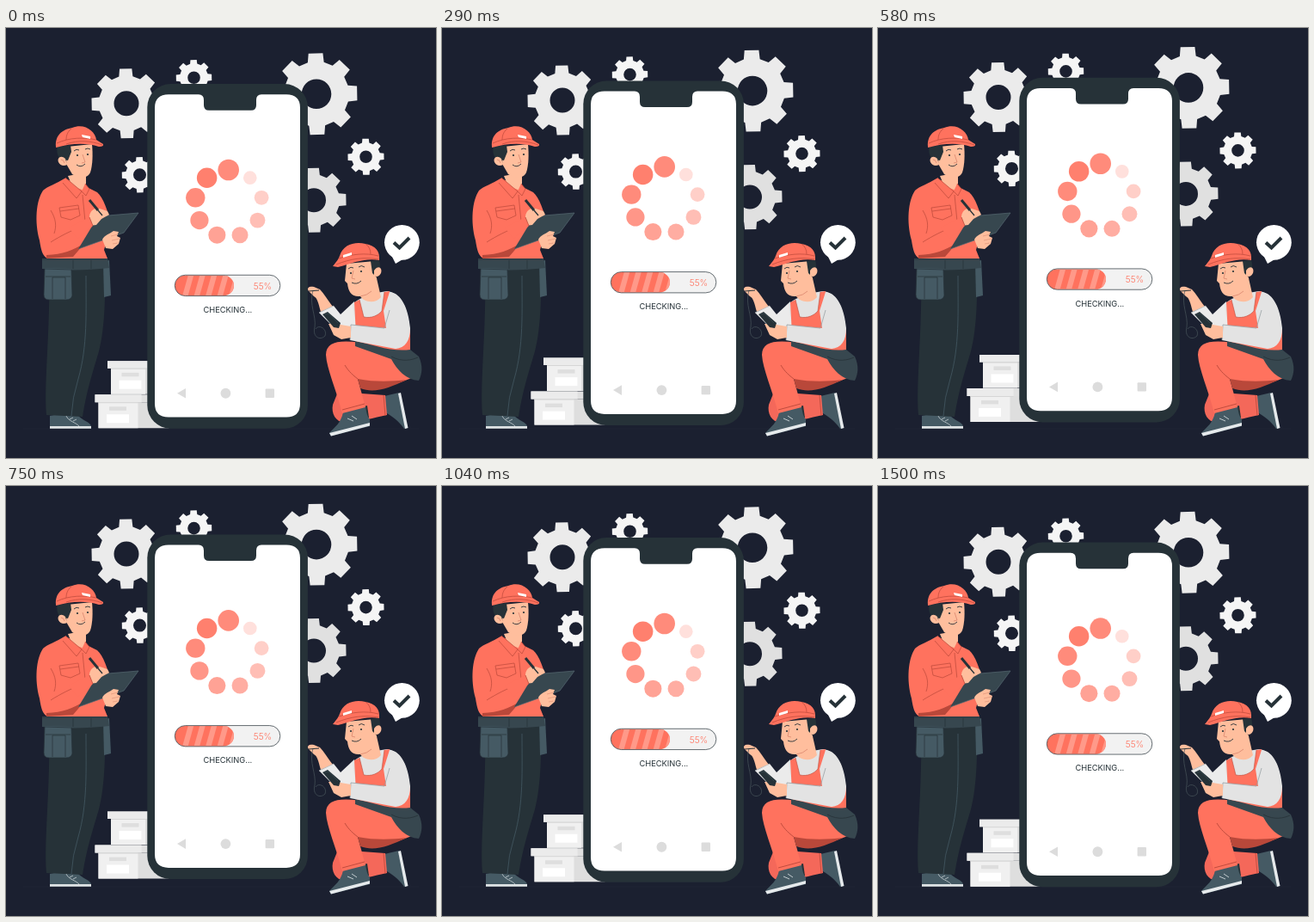
Write an HTML page with a canvas that moves like this. It is 500 px wide and 500 px high and loops after 1.54 s.

```html
<!DOCTYPE html>
<html lang="en">
<head>
<meta charset="utf-8">
<title>Checking</title>
<style>
html, body { margin: 0; width: 100%; height: 100%; overflow: hidden; background: #1b2030; }
canvas { display: block; width: 500px; height: 500px; }
</style>
</head>
<body>
<canvas id="stage" width="500" height="500"></canvas>
<script>
const ctx = document.getElementById('stage').getContext('2d');
const LOOP = 1540, FPS = 24, FRAMES = 37;
const BG = '#1b2030', CORAL = '#ff725e', SHADE = '#b9483a', SKIN = '#ffbe9d',
      INK = '#263238', SLATE = '#37474f', STEEL = '#455a64', CLOTH = '#e3e3e3';

function fill(d, color) {
  ctx.fillStyle = color;
  ctx.fill(new Path2D(d));
}

function line(d, color = INK, width = 0.8) {
  ctx.strokeStyle = color;
  ctx.lineWidth = width;
  ctx.stroke(new Path2D(d));
}

function disc(x, y, r, color) {
  ctx.fillStyle = color;
  ctx.beginPath();
  ctx.arc(x, y, r, 0, Math.PI * 2);
  ctx.fill();
}

function box(x, y, w, h, color, r = 0) {
  ctx.fillStyle = color;
  ctx.beginPath();
  ctx.roundRect(x, y, w, h, r);
  ctx.fill();
}

function text(str, x, y, size, weight, color) {
  ctx.font = `${weight} ${size}px Inter, sans-serif`;
  ctx.fillStyle = color;
  ctx.fillText(str, x, y);
}

function gear(x, y, radius, hole, color) {
  const teeth = 8, root = radius * 0.79;
  ctx.fillStyle = color;
  ctx.beginPath();
  for (let i = 0; i < teeth; i++) {
    const mid = i * Math.PI * 2 / teeth - Math.PI / 2 - 0.02;
    for (const [a, r] of [[-0.25, root], [-0.175, radius], [0.175, radius], [0.25, root]]) {
      ctx.lineTo(x + Math.cos(mid + a) * r, y + Math.sin(mid + a) * r);
    }
  }
  ctx.closePath();
  ctx.moveTo(x + hole, y);
  ctx.arc(x, y, hole, 0, Math.PI * 2, true);
  ctx.fill();
}

function gears() {
  gear(140, 88, 41, 14.5, '#ebebeb');
  gear(218.5, 58, 21, 7.3, '#f5f5f5');
  gear(361, 77, 48, 17.3, '#ebebeb');
  gear(418.5, 150, 21.3, 7.3, '#f5f5f5');
  gear(358, 200.5, 38, 14, '#e0e0e0');
  gear(155.5, 171, 21, 7.5, '#f5f5f5');
}

function carton(x, y, bodyWidth, bodyHeight, lidHeight) {
  box(x + 4, y + lidHeight, bodyWidth + 36, bodyHeight, '#dedede');
  box(x + 4, y + lidHeight, bodyWidth, bodyHeight, '#f0f0f0');
  box(x, y, bodyWidth + 36, lidHeight, '#e0e0e0');
  box(x, y, bodyWidth + 8, lidHeight, '#ebebeb');
  box(x + 4, y + lidHeight, bodyWidth + 4, 1, '#d6d6d6');
  box(x + 16.5, y + lidHeight + 5, 20, 4.5, '#dedede');
  box(x + 13.5, y + lidHeight + 14, 26, 10, '#fff');
}

function spinner() {
  const alphas = [0.82, 0.9, 0.82, 0.74, 0.66, 0.58, 0.46, 0.34, 0.22];
  alphas.forEach((alpha, i) => {
    const a = -Math.PI / 2 - i * Math.PI * 2 / alphas.length;
    ctx.globalAlpha = alpha;
    disc(258.7 + 39 * Math.cos(a), 204.3 + 39 * Math.sin(a), 12.3 - i * 0.56, CORAL);
  });
  ctx.globalAlpha = 1;
}

function progressBar() {
  box(196.3, 287.5, 122.5, 24.3, '#f2f2f2', 12.1);
  ctx.save();
  ctx.beginPath();
  ctx.roundRect(196.5, 288, 68.5, 23.4, 11.7);
  ctx.clip();
  box(196, 287, 70, 26, CORAL);
  for (let x = 205; x < 265; x += 13.5) {
    fill(`M${x} 312h6.5l7-25h-6.5Z`, '#ff9989');
  }
  ctx.restore();
  ctx.strokeStyle = INK;
  ctx.lineWidth = 0.7;
  ctx.beginPath();
  ctx.roundRect(196.3, 287.5, 122.5, 24.3, 12.1);
  ctx.stroke();
  text('55%', 287.8, 304, 10.2, 300, CORAL);
  text('CHECKING...', 229.5, 331.2, 9.3, 400, INK);
}

function phone() {
  box(164.3, 65.3, 186.6, 400.7, INK, 27);
  fill('M189 77.5H224Q230 77.5 230 84V90Q230 96 236 96H285Q291 96 291 90V84Q291 77.5 297 77.5H326' +
       'Q342 77.5 342 93V437Q342 452.8 326 452.8H189Q173 452.8 173 437V93Q173 77.5 189 77.5Z', '#fff');
  spinner();
  progressBar();
  fill('M199 425L209 419.2V430.8Z', '#dcdcdc');
  disc(255.4, 425, 5.9, '#dcdcdc');
  box(301.6, 419.8, 10.4, 10.4, '#dcdcdc', 1);
}

function standingWorker() {
  // shoes and trousers
  fill('M51 451L61 449L83 450C88 456 98 458 99 463V465.5H51Z', STEEL);
  fill('M51 463H99V465.7H51Z', '#dfe3e5');
  line('M70 451C72 457 82 459 85 463M74 455l4 -2M78 457l4 -2', '#c7d0d4', 0.8);
  fill('M50 278H115C116 318 114 354 108 376C101 400 94 420 89 452L47 450C44 410 52 350 50 278Z', INK);
  line('M93 288C93 330 95 370 84 408Q77 430 76 451', STEEL, 0.8);

  // shirt
  fill('M68 175C59 181 48 184 43 189C35 201 33 225 39 247C41 259 42 264 48 268H118L114 258L122 230' +
       'C119 213 113 197 106 191L92 184Z', CORAL);
  fill('M72 172L93 168V181L91 189L77 184Z', SKIN);
  fill('M69 174L88 190L82 198L66 180Z', CORAL);
  fill('M92 181L97 187L93 195L88 190Z', CORAL);
  line('M69 174L88 190L82 198L66 180M92 181L97 187L93 195L88 190M89 194L92 225M62 209L84 206L86 218L75 223L64 220Z' +
       'M63 213L85 210M52 212C58 222 59 230 56 239M52 249C63 242 75 236 92 229', SHADE, 0.7);
  fill('M47 264C66 263 78 259 91 250L84 259L78 266L47 268Z', SHADE);

  // belt and pouches
  fill('M113 272L120 270L122 311L114 313Z', STEEL);
  fill('M42 268H118L120 279C96 282 68 282 42 280Z', SLATE);
  line('M42 269H117M78 270V280M99 270V280', INK, 0.7);
  fill('M45 279L76 280L77 311Q76 316 70 316H50Q44 316 44 310Z', STEEL);
  line('M45 280L76 281L77 311Q76 316 70 316H50Q44 316 44 310ZM54 290H69V315M54 290V315M46 289H75', INK, 0.7);

  // clipboard and hands
  fill('M107 219L154 215L137 238L84 257Z', SLATE);
  line('M107 219L154 215L137 238L84 257', '#566971', 0.7);
  fill('M112 246C114 241 121 239 125 236L131 237L129 242L133 244L131 251L124 257L116 256Z', SKIN);
  line('M122 242L130 240M123 247L132 245M124 251L130 250', '#d98d75', 0.6);
  fill('M97 219C98 212 103 209 109 210L118 213L120 217L111 222L105 229L97 230Z', SKIN);
  fill('M73 232L97 220L101 230L83 245Z', CORAL);
  line('M97 220L101 230', SHADE, 0.8);
  line('M97 200L107 212', INK, 3);
  line('M107 212L112 218', INK, 1.3);

  // head
  fill('M60 139C58 145 61 151 65 155L75 155V137Z', INK);
  fill('M71 138L100 135C101 146 101 159 98 168C94 176 84 175 77 170L70 158Z', SKIN);
  fill('M59 138L75 136L76 144L72 154L67 153L61 148Z', INK);
  fill('M69 152C64 147 59 151 61 156C63 160 67 161 71 159Z', SKIN);
  line('M64 153Q67 153 68 157M89 147L92 156L88 157', '#d47f68', 0.7);
  line('M79 143Q82 140 85 142M92 141Q95 139 98 141M82 159Q87 163 92 158', INK, 0.9);
  disc(83, 148, 1.1, INK);
  disc(95, 147, 1.1, INK);

  // cap
  fill('M58 138C57 124 66 118 77 116C91 110 104 120 105 130L113 135Q114 138 108 138C93 133 76 134 58 139Z', CORAL);
  line('M59 134C74 127 91 127 105 130M70 135C84 130 98 131 112 136M76 117C71 121 70 126 70 130', SHADE, 0.7);
  fill('M88 124L98 126V129L89 127Z', '#fff');
}

function kneelingWorker() {
  // rear leg
  fill('M440 428L457 424C460 439 465 455 467 465L463 466C457 457 447 450 441 447Z', STEEL);
  fill('M456 425L459 424L467.5 465L464 466Z', '#e6eaec');
  fill('M386 423L441 427L443 450C428 453 412 458 394 459C383 458 378 448 380 438Z', '#f4685a');
  line('M439 427L441 451', SHADE, 0.8);

  // rear arm and torso
  fill('M352 306C349 302 353 300 358 301L365 304C370 309 373 315 380 324L366 330C363 319 362 314 358 312Z', SKIN);
  fill('M364 331L381 323L389 333L405 318L409 348L381 348Z', '#ebebeb');
  line('M364 331L381 323', '#b8bec1', 0.7);
  fill('M403 321C410 314 429 307 444 306C460 309 467 327 469 347L470 377L410 370Z', CLOTH);
  fill('M405 319L411 316L416 336C425 338 433 334 437 329L440 307L446 306L445 332L470 350V382L408 374Z', CORAL);
  line('M411 316L416 336C425 338 433 334 437 329L440 307', SHADE, 0.6);

  // front leg
  fill('M401 444L420 439L422 453L400 456Z', INK);
  fill('M392 447L418 440C419 446 420 452 423 455V463L378 474.5L376 471C383 463 389 460 392 447Z', STEEL);
  fill('M376 471L423 459V462.5L378 474.5Z', '#e6eaec');
  line('M397 454l7 3M402 451l6 4', '#d1d9dc', 0.9);
  fill('M378 368C391 360 425 367 468 377C484 386 483 403 469 408C448 416 428 424 409 408L418 441L391 448' +
       'C384 420 373 397 372 380Q372 372 378 368Z', CORAL);
  line('M409 408C401 402 397 397 394 392M391 444L417 437', SHADE, 0.9);
  fill('M409 408C430 412 449 411 466 409C445 419 428 425 412 419Z', SHADE);
  fill('M406 364C426 368 448 377 470 374L480 382C485 393 484 402 480 410C465 409 455 398 448 385L406 370Z', SLATE);
  line('M448 382C461 389 472 386 479 383', INK, 0.8);

  // front arm, tester and cable
  fill('M446 307C460 308 468 327 470 349C470 364 464 372 453 373L400 363L401 345L442 349L439 329Z', CLOTH);
  line('M401 345L400 363M401 345L440 349L446 328', '#8f989c', 0.7);
  fill('M375 344C380 344 385 341 389 345L401 347V360L390 362L381 357Z', SKIN);
  fill('M368 333L374 330L389 343L387 349L381 348Z', INK);
  line('M370 333L375 332L386 343', SLATE, 0.8);
  line('M357 305C352 322 361 334 359 348C356 359 365 364 371 358C374 350 364 344 360 350', '#4a565c', 0.7);
  line('M352 306L364 305', INK, 1);

  // head
  fill('M396 274L429 271L431 291L436 313C430 321 416 319 412 312C402 313 398 307 397 297L394 294Z', SKIN);
  fill('M424 271L434 270C436 277 435 283 431 290L426 285Z', INK);
  fill('M428 282C433 275 438 279 436 285C434 289 431 290 428 288Z', SKIN);
  line('M404 282L402 291L406 292M412 312Q420 311 425 306', '#d47f68', 0.7);
  line('M398 280Q401 277 404 279M410 278Q413 275 417 278M402 296Q408 299 413 294', INK, 0.9);
  disc(401, 285, 1.1, INK);
  disc(413, 283, 1.1, INK);

  // cap
  fill('M380 277C384 272 386 270 388 265C392 252 405 248 418 251C430 253 435 260 434 270C416 267 402 274 386 278Z', CORAL);
  line('M387 268C402 263 418 261 433 265M384 275C401 268 417 266 433 269M418 251Q424 255 424 263', SHADE, 0.7);
  fill('M392 264L402 261V264L392 267Z', '#fff');
}

function bubble() {
  disc(460.4, 249.3, 20.4, '#fff');
  fill('M448 264L453 274L463 268Z', '#fff');
  line('M451 249.5L457.5 255.5L469 244', INK, 4);
}

// Straight drift up, then straight back down.
function drift(time) {
  const frame = Math.min(Math.floor((time + 3.5) * FPS / 1000), FRAMES - 1);
  const phase = (frame * 1000 / FPS + 50) % LOOP / LOOP;
  return 0.4 - 9.7 * (1 - Math.abs(1 - 2 * phase));
}

function draw() {
  ctx.fillStyle = BG;
  ctx.fillRect(0, 0, 500, 500);
  line('M20 466H480', '#202838', 0.7);
  ctx.save();
  ctx.translate(0, drift(performance.now() % LOOP));
  gears();
  carton(118, 387.5, 40, 30, 8.5);
  carton(103.5, 426.5, 46, 30, 9);
  phone();
  ctx.restore();
  standingWorker();
  kneelingWorker();
  bubble();
  requestAnimationFrame(draw);
}

draw();
</script>
</body>
</html>
```
